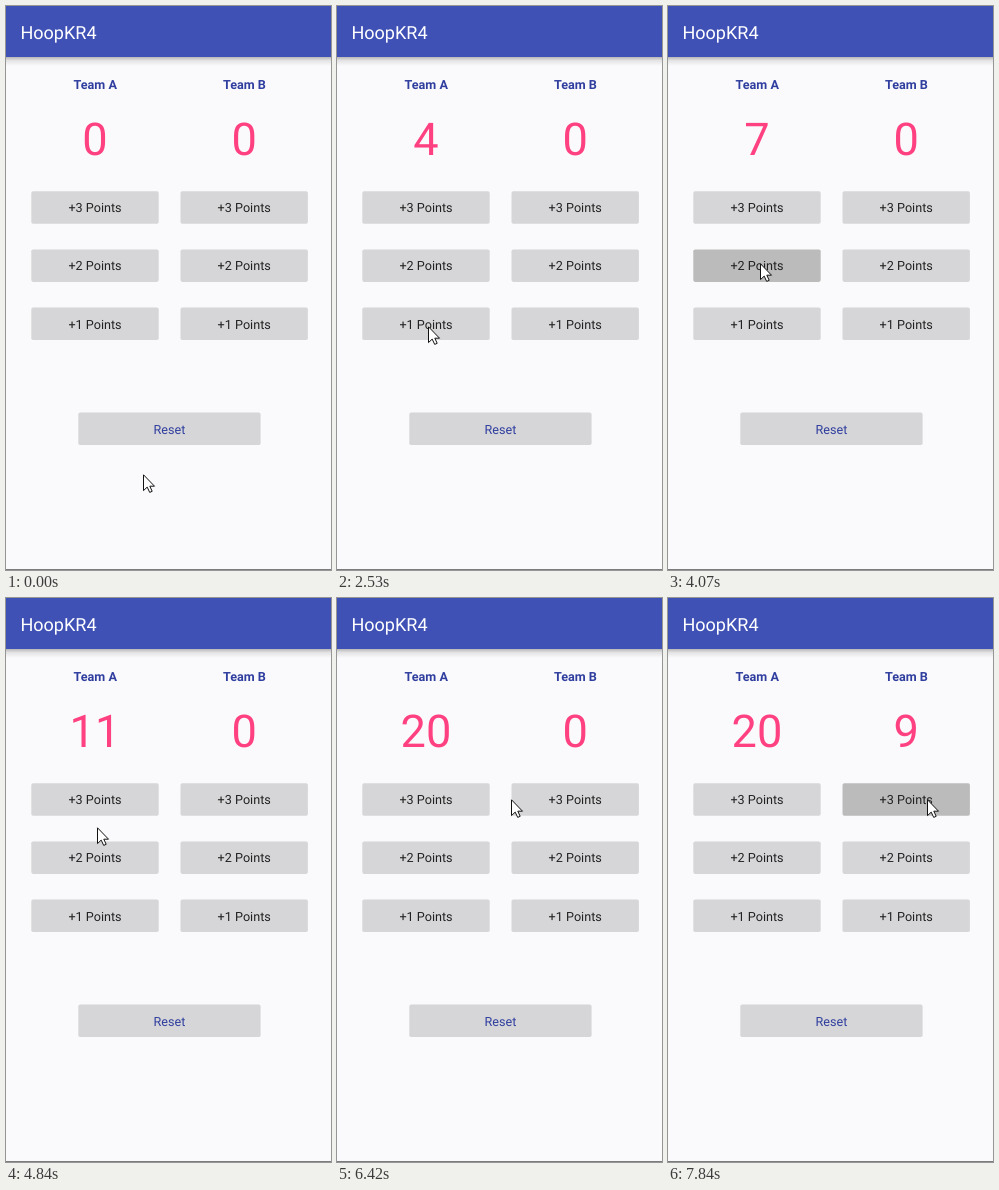
An HTML page that plays this animation: 325x564 px, repeating every 7.99 s.

```html
<!DOCTYPE html>
<html lang="en">
<head>
<meta charset="utf-8">
<title>Score keeper</title>
<style>
  html, body { margin: 0; width: 100%; height: 100%; overflow: hidden; background: #fafafc; }
  svg { display: block; width: 100%; height: 100%; }
  text { font: 12.64px Roboto, sans-serif; text-rendering: geometricPrecision; }
  .mid text, text.mid { text-anchor: middle; }
  .title { font-size: 18.06px; fill: #fff; }
  .team { font-weight: 700; fill: #303f9f; }
  .score { font-size: 45.16px; fill: #ff4081; }
  .button rect { fill: #d6d6d8; }
  .button.down rect { fill: #bbbbbc; }
  .button text { fill: #212121; }
  .button.reset text { fill: #303f9f; }
</style>
</head>
<body>
<svg viewBox="0 0 325 564">
  <defs>
    <linearGradient id="shade" x2="0" y2="1">
      <stop offset="0" stop-color="#000" stop-opacity=".27"/>
      <stop offset=".4" stop-color="#000" stop-opacity=".09"/>
      <stop offset="1" stop-color="#000" stop-opacity="0"/>
    </linearGradient>
  </defs>
  <rect width="325" height="564" fill="#fafafc"/>
  <rect y="51" width="325" height="9" fill="url(#shade)"/>
  <rect width="325" height="51" fill="#3f51b5"/>
  <text class="title" x="14.4" y="33">HoopKR4</text>
  <g id="board" class="mid"></g>
  <rect y="563" width="325" height="1" fill="#7c7c7e"/>
  <path id="cursor" d="M.5 .8V16.6L4.2 13.1L6.7 18.4L9.2 17.3L6.8 12.2H11.5Z" fill="#fff" stroke="#111" stroke-width="1" stroke-linejoin="round"/>
</svg>
<script>
const LOOP = 7990;
const board = document.getElementById('board');
const cursor = document.getElementById('cursor');

function add(parent, tag, attrs, label) {
  const el = document.createElementNS('http://www.w3.org/2000/svg', tag);
  for (const key in attrs) el.setAttribute(key, attrs[key]);
  if (label) el.textContent = label;
  return parent.appendChild(el);
}

function addButton(x, y, width, label, kind = '') {
  const g = add(board, 'g', { class: 'button ' + kind });
  add(g, 'rect', { x, y, width, height: 32.5, rx: 1.8 });
  add(g, 'text', { x: x + width / 2, y: y + 21 }, label);
  return g;
}

const scores = {};
const buttons = {};
[['A', 89], ['B', 238.2]].forEach(([team, x]) => {
  add(board, 'text', { class: 'team', x: x + 0.2, y: 82.5 }, 'Team ' + team);
  scores[team] = add(board, 'text', { class: 'score', x, y: 149 }, '0');
  for (let n = 3; n > 0; n--) {
    buttons[team + n] = addButton(x - 63.7, 185.2 + (3 - n) * 58.2, 127.4, `+${n} Points`);
  }
});
addButton(72.3, 406.6, 182.3, 'Reset', 'reset');

// button, then [down, up] times
const presses = {
  A1: [[1320, 1590], [1990, 2120], [2260, 2530], [2680, 2820]],
  A2: [[4070, 4190], [4370, 4560]],
  A3: [[5260, 5410], [6140, 6280]],
  B3: [[7100, 7410], [7550, 7690], [7840, LOOP]]
};

// button, then the times its points are counted
const points = {
  A1: [1590, 2120, 2260, 2530, 2820],
  A2: [3800, 4190, 4560],
  A3: [5410, 5720, 6280],
  B3: [7250, 7410, 7690]
};

// the pointer hops: first hop, last hop, number of hops, goal
const home = [137, 468];
const moves = [
  [590, 1050, 4, 91, 320],
  [2960, 3400, 4, 92, 257],
  [4840, 4990, 2, 89, 201],
  [6420, 6550, 2, 259, 201]
];

function pointerAt(t) {
  let [x, y] = home;
  for (const [start, end, hops, goalX, goalY] of moves) {
    if (t < start) break;
    const hop = Math.floor((t - start) / (end - start) * (hops - 1) + 1e-6) + 1;
    const u = Math.min(1, hop / hops);
    const ease = u * u * (3 - 2 * u);
    x += (goalX - x) * ease;
    y += (goalY - y) * ease;
  }
  return [Math.round(x), Math.round(y)];
}

function draw(t) {
  const total = { A: 0, B: 0 };
  for (const key in points) {
    total[key[0]] += key[1] * points[key].filter(at => t >= at).length;
  }
  for (const team in scores) scores[team].textContent = total[team];
  for (const key in presses) {
    const down = presses[key].some(([from, to]) => t >= from && t < to);
    buttons[key].classList.toggle('down', down);
  }
  cursor.setAttribute('transform', `translate(${pointerAt(t)})`);
}

const began = performance.now();
function tick() {
  draw((performance.now() - began) % LOOP);
  requestAnimationFrame(tick);
}
tick();
</script>
</body>
</html>
```
